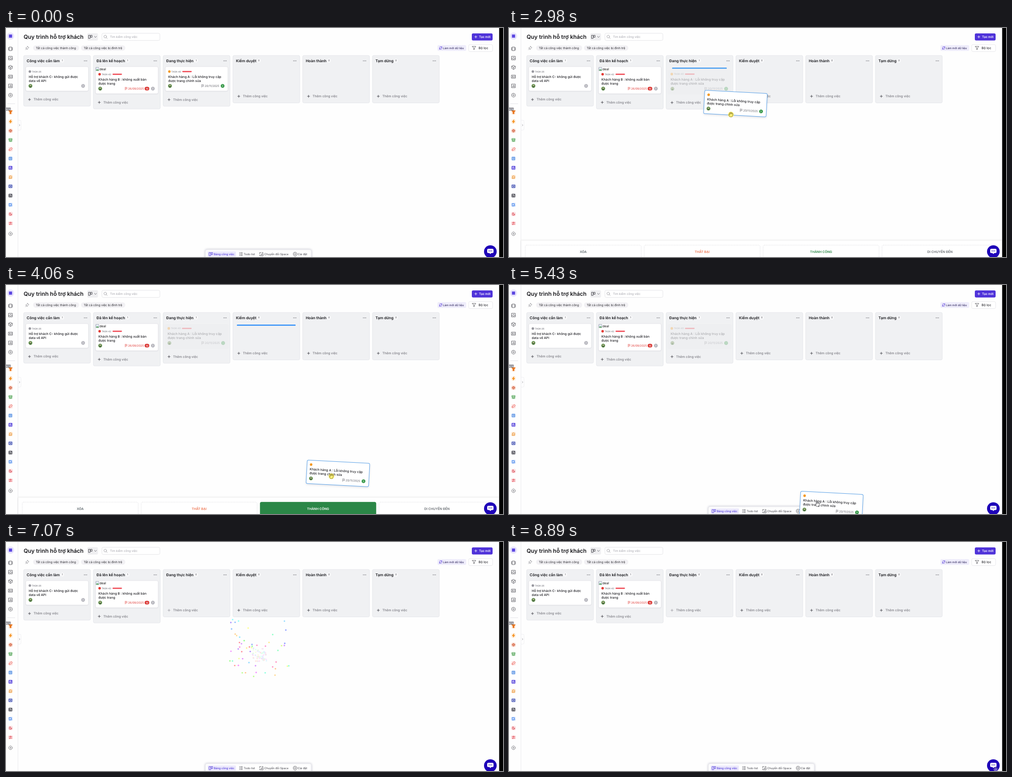
Recreate the animation shown at these times as an HTML page with a canvas. Size 1100 by 509 pixels, loop 8.96 s.

```html
<!DOCTYPE html>
<html lang="vi">
<head>
<meta charset="utf-8">
<title>Bảng công việc</title>
<style>
html, body { margin: 0; width: 100%; height: 100%; overflow: hidden; background: #fff; }
canvas { display: block; width: 1100px; height: 509px; }
</style>
</head>
<body>
<canvas id="stage" width="1100" height="509"></canvas>
<script>
const ctx = document.getElementById('stage').getContext('2d');
const LOOP = 8960, LIFT = 2630, DROP = 5430, RETURNED = 5680, SUCCESS = 5730;

// ---------- drawing helpers ----------
function text(str, x, y, size, color, weight = 400, align = 'left') {
  ctx.font = `${weight} ${size}px Inter, sans-serif`;
  ctx.textAlign = align;
  ctx.fillStyle = color;
  ctx.fillText(str, x, y);
  return ctx.measureText(str).width;
}
function box(x, y, w, h, r, fill, stroke, lineWidth = 0.7) {
  ctx.beginPath();
  ctx.roundRect(x, y, w, h, r);
  if (fill) { ctx.fillStyle = fill; ctx.fill(); }
  if (stroke) { ctx.strokeStyle = stroke; ctx.lineWidth = lineWidth; ctx.stroke(); }
}
function dot(x, y, r, fill) {
  ctx.beginPath();
  ctx.arc(x, y, r, 0, 7);
  ctx.fillStyle = fill;
  ctx.fill();
}
function icon(path, x, y, stroke, lineWidth = 0.8, fill) {
  const shape = new Path2D(path);
  ctx.save();
  ctx.translate(x, y);
  ctx.lineCap = ctx.lineJoin = 'round';
  if (fill) { ctx.fillStyle = fill; ctx.fill(shape); }
  if (stroke) { ctx.strokeStyle = stroke; ctx.lineWidth = lineWidth; ctx.stroke(shape); }
  ctx.restore();
}
function shadowed(color, blur, dy, paint) {
  ctx.save();
  ctx.shadowColor = color;
  ctx.shadowBlur = blur;
  ctx.shadowOffsetY = dy;
  paint();
  ctx.restore();
}

// Smooth curve through [time, x, y] keys; it rests where neighbours repeat.
function follow(keys, t) {
  const last = keys.length - 1;
  if (t <= keys[0][0]) return keys[0].slice(1);
  if (t >= keys[last][0]) return keys[last].slice(1);
  const i = keys.findIndex(k => k[0] > t) - 1;
  const slope = (n, c) => {
    const a = keys[n - 1], b = keys[n], d = keys[n + 1];
    if (!a || !d || a[c] === b[c] || b[c] === d[c]) return 0;
    return (d[c] - a[c]) / (d[0] - a[0]);
  };
  const span = keys[i + 1][0] - keys[i][0], u = (t - keys[i][0]) / span;
  const ease = u * u * (3 - 2 * u);
  return [1, 2].map(c => keys[i][c] + (keys[i + 1][c] - keys[i][c]) * ease
    + span * u * (1 - u) * (slope(i, c) * (1 - u) - slope(i + 1, c) * u));
}

const cardPath = [[LIFT, 422, 113], [2980, 501, 167.7], [3350, 535, 310], [3650, 580, 400],
  [4060, 734.3, 418.7], [4250, 755, 425], [4480, 735, 435], [5000, 713.5, 488], [DROP, 713.5, 488], [RETURNED, 422, 113]];
const cursorPath = [[240, 1027, 493], [1090, 217, 120], [1500, 391, 111], [LIFT, 391, 111],
  [2980, 491, 192], [3350, 520, 325], [3650, 562, 410], [4060, 720, 425], [4250, 735, 428],
  [4480, 710, 440], [5000, 683, 487], [DROP, 683, 487], [5950, 775, 450]];

// ---------- icon paths, centred on 0,0 ----------
const PLUS = 'M-2.6 0H2.6M0-2.6V2.6';
const NEXT = 'M-.9-1.7L.9 0L-.9 1.7';
const BOARD = 'M-3.8-3.5H-.5V3.5H-3.8ZM1-3.5H3.8V1H1Z';
const FLAG = 'M-2 3.2V-3M-2-2.6H2.2L1.1-1L2.2.6H-2';
const FUNNEL = 'M-4-3.5H4L1-.2V3L-1 3.8V-.2Z';
const GEAR = 'M-1.6-4H1.6L4-1.8V1.8L1.6 4H-1.6L-4 1.8V-1.8ZM1.4 0A1.4 1.4 0 1 1 1.4-.1';
const HAND = 'M-2.6 4.8L-4.8.7C-5.3-.5-3.9-1.1-3.2-.2L-2.3 1L-3.4-2.9C-3.7-4.2-2.2-4.5-1.8-3.3L-1.2-1.2'
  + 'L-1.3-4.1C-1.3-5.4.3-5.4.4-4.1L.6-1.3L1.3-3.7C1.6-4.8 3-4.5 2.8-3.3L2.3-.7L3.4-2C4.2-2.8 5.1-2 4.6-1L3.2 2.6L2.6 4.8Z';

const menuIcons = [
  'M-2.5-4H2.5V4H-2.5ZM-4.3-3V3M4.3-3V3',
  'M-4-4H4V4H-4ZM-4 1H-1.5L-.7 2.2H.7L1.5 1H4M-1.5-1.5H1.5',
  'M0-4.4L4-2.2V2.2L0 4.4L-4 2.2V-2.2ZM-4-2.2L0 0L4-2.2M0 0V4.4',
  'M-4.3-3.3H4.3V3.3H-4.3ZM-2.8 1.8C-2.5.2-.3.2 0 1.8M-1.9-1.2H-.9V-.2H-1.9ZM1.6-1H3M1.6 1H3',
  'M-4-4H4V4H-4ZM-1.9 2V0M0 2V-2M1.9 2V-.8',
  GEAR];

const SHEET = 'M-2.8-3H2.8V3H-2.8ZM-1.3-1.2H1.3M-1.3.8H1.3';
const GLOBE = 'M3 0A3 3 0 1 1 3-.1M-3 0H3M0-3V3';
const appIcons = [
  ['#e8741c', '#fdebdc', 'M-4-3.5H4L1.2 0V3.5H-1.2V0Z', true],
  ['#f59324', '#fff0df', 'M.8-4L-3 .7H-.4L-.8 4L3-.7H.4Z', true],
  ['#d0522d', '#fae3da', GLOBE],
  ['#3c9642', '#e2f2e2', 'M-3.2-3H3.2V-.5H-3.2ZM-2.6-.5V3H2.6V-.5M0 .7V3'],
  ['#ea5c56', '#fde4e2', 'M-2.8 1.2L-.8-.8M-1.4-1.5L.4-3A1.7 1.7 0 0 1 3-.4L1.5 1.4M1 .9L-.5 2.7A1.7 1.7 0 0 1-3 .2'],
  ['#2f76db', '#dfeafb', SHEET],
  ['#2a14cc', '#cfc9f8', 'M-3-3H3V3H-3ZM-1.3 0L0 1.2L3-2.6'],
  ['#e88a28', '#fdead3', 'M-3 2.7L-2.2-2L.5-3L3-1L2.2 2.7ZM-1 .5H1'],
  ['#1f2f9a', '#d6dbf6', 'M-3.2-2.8H3.2V2.8H-3.2ZM-1.5-1L1.5 1M1.5-1L-1.5 1'],
  ['#16161c', '#d8d8de', 'M-3-3H3V3H-3ZM-3 0H0V3M1-1H2'],
  ['#2c74e6', '#dbe8fd', 'M-3-2.6H2V-.5M-3-2.6V2.6H0M2.8 1.4A1.3 1.3 0 1 1 2.8 1.3'],
  ['#d8434e', '#fbdfe1', 'M3 .3A3 3 0 1 1-.3-3V.3Z'],
  ['#dd3d49', '#fde3e4', 'M-3.3-1.5H3.3M-3.3 1.8H3.3M0-3V0M-1.4 1.8V3']];

// ---------- page frame ----------
function sidebar() {
  box(26, -1, 0.8, 511, 0, '#e6e6ea');
  dot(10, 18, 8, '#e9e5fc');
  box(6.5, 14.5, 7, 7, 0, '#5a45e0');
  menuIcons.forEach((path, i) => icon(path, 10, 46.3 + i * 20.6, '#3a3a42', 0.8));
  box(3, 167.8, 17, 0.8, 0, '#dcdce2');
  appIcons.forEach(([color, pale, path, solid], i) => {
    const y = 187.3 + i * 20.57;
    box(5.3, y - 4.7, 9.4, 9.4, 2, pale);
    icon(path, 10, y, color, 1, solid && color);
  });
  box(-2, 177, 12.5, 6.5, 1, '#85858d');
  text('BETA', -0.5, 182, 4.1, '#fff', 600);
  icon('M4 0A4 4 0 1 1 4-.1M-1.4 0H1.4M0-1.4V1.4', 10, 457.5, '#55555c', 0.8);
  box(26.6, 205, 6.6, 22, [0, 3, 3, 0], '#fff', '#e9e9ed');
  icon(NEXT, 30, 216, '#77777f', 0.7);
}

function header() {
  text('Quy trình hỗ trợ khách', 39, 24.2, 12.36, '#17171b', 600);
  box(180, 11.5, 23.5, 16.5, 3, '#efeff1');
  icon(BOARD, 186.7, 19.7, '#33333a', 0.9);
  icon('M-2.5-1.2L0 1.3L2.5-1.2', 198, 19.7, '#55555c');
  box(212.3, 11.8, 128.3, 15.8, 3, '#fff', '#dadade');
  icon('M2.4-.6A3 3 0 1 1 2.4-.7M1.6 1.6L3.8 3.8', 220.3, 19.7, '#77777f', 0.7);
  text('Tìm kiếm công việc', 230, 22.1, 6.65, '#a2a2aa');
  box(1031, 12, 46, 15.8, 3, '#4f33d9');
  icon(PLUS, 1039.8, 19.7, '#fff', 0.9);
  text('Tạo mới', 1047, 22.2, 6.65, '#fff', 600);

  icon('M.5-3.8L3.8-.5L2.2 0L.3 2L.2 3.6L-3.4 0L-1.8-.2L0-2.2ZM-1.6 1.8L-3.8 4', 47, 44.3, '#66666e', 0.7);
  box(60, 38.5, 102, 12, 6, '#f2f1f4');
  text('Tất cả công việc thành công', 66, 46.9, 6.65, '#222228');
  box(166, 38.5, 98, 12, 6, '#f2f1f4');
  text('Tất cả công việc bị đình trệ', 172, 46.9, 6.65, '#222228');
  box(955, 38, 63.5, 13, 3, '#efedfb');
  icon('M-2.7-.6A2.8 2.8 0 0 1 2.3-1.6M2.7-3V-1.2H1M2.7.6A2.8 2.8 0 0 1-2.3 1.6M-2.7 3V1.2H-1', 962, 44.4, '#4f33d9', 0.9);
  text('Làm mới dữ liệu', 967, 46.7, 6.18, '#352d63', 500);
  box(1024, 36.8, 53, 15.6, 3, '#fff', '#dedee3');
  icon(FUNNEL, 1036, 44.4, '#44444b', 0.8);
  text('Bộ lọc', 1046, 47, 7.2, '#2c2c32', 500);
}

function bottomTabs() {
  shadowed('rgba(40,40,80,.22)', 5, 0, () => box(441, 492.3, 235, 24, 4, '#fff', '#dfdfe5'));
  box(446, 496.8, 63, 11.5, 2, '#ece9fc');
  icon(BOARD, 453.6, 502.6, '#4b35d9', 0.9);
  text('Bảng công việc', 460, 504.8, 6.18, '#4b35d9', 500);
  icon('M-3.3-3H-2M-3.3 0H-2M-3.3 3H-2M-.5-3H3.4M-.5 0H3.4M-.5 3H3.4', 520, 502.6, '#33333a', 0.9);
  text('Todo list', 526.3, 504.8, 6.18, '#3a3a42');
  icon('M-3.8-1V-3.5H-1M-3.8 1.5V3.5H-1.5M1-3.5H3.5V-1.5M0 0H3.8V3.6H0Z', 565.3, 502.6, '#33333a', 0.8);
  text('Chuyển đổi Space', 571.8, 504.8, 6.18, '#3a3a42');
  icon(GEAR, 640, 502.6, '#33333a', 0.8);
  text('Cài đặt', 646, 504.8, 6.18, '#3a3a42');
}

function chatButton() {
  dot(1072, 497, 14, '#1e04b8');
  icon('M-4.5-5.5H4.5Q7-5.5 7-3V1.5Q7 4 4.5 4H2L0 6.3L-2 4H-4.5Q-7 4-7 1.5V-3Q-7-5.5-4.5-5.5Z', 1072, 496.2, null, 0, '#fff');
  [-3, 0, 3].forEach(dx => dot(1072 + dx, 495.5, 1, '#1e04b8'));
}

// ---------- board ----------
const columnX = i => 39 + 154.4 * i;

const cards = [
  { id: 'TASK-26', dot: '#98989f', lines: ['Hỗ trợ khách C- không gửi được', 'data về API'], next: '#b8b8bf' },
  { id: 'TASK-42', dot: '#e23a34', bar: true, image: true, lines: ['Khách hàng B : không xuất bản', 'được trang'],
    date: '26/09/2025', dateColor: '#e03a36', late: '10', next: '#b8b8bf' },
  { id: 'TASK-40', dot: '#f49a24', bar: true, lines: ['Khách hàng A : Lỗi không truy cập', 'được trang chỉnh sửa'],
    date: '20/11/2025', dateColor: '#62626a', next: '#3a9a4c' }];

function drawCard(card, x, y, { border = '#e4e4e9', lineWidth = 0.7, compact = false, raised = false } = {}) {
  const height = card.image ? 60 : compact ? 52 : 54;
  ctx.save();
  ctx.translate(x, y);
  shadowed('rgba(30,30,60,.15)', raised ? 5 : 2, raised ? 2 : 0.5,
    () => box(0, 0, 138.5, height, 3, '#fff'));
  box(0, 0, 138.5, height, 3, null, border, lineWidth);
  if (card.image) {
    box(0.6, 1.6, 7, 7.4, 0.5, '#e4ecf8', '#8a929c', 0.7);
    icon('M-3 2.8L-1 0L.5 1.4L2 0L3 2.8Z', 4, 5.6, null, 0, '#4fa04f');
    text('deal', 8.7, 8.2, 7.2, '#111');
    ctx.translate(0, 6);
  }
  dot(9, compact ? 9.6 : 10.8, 2.8, card.dot);
  if (compact) {
    ctx.translate(0, -2.4);
  } else {
    text(card.id, 13.5, 12.6, 5, '#73737b', 500);
    if (card.bar) box(37.5, 9.4, 21, 2.8, 1.4, '#ef4a55');
  }
  card.lines.forEach((line, i) => text(line, 6.4, 24.9 + i * 8.7, 7.18, '#1c1c21', 500));
  dot(10.3, 42.7, 4.2, '#5f8f4c');
  dot(10.3, 41.9, 1.6, '#c9b49a');
  box(8.2, 43.6, 4.2, 1.8, 0.9, '#3f5c39');
  dot(126.8, 42.7, 4.2, card.next);
  icon(NEXT, 126.8, 42.7, '#fff', 0.8);
  if (card.date) {
    const end = card.late ? 107 : 119.4;
    const width = text(card.date, end, 44.9, 6.18, card.dateColor, 400, 'right');
    icon(FLAG, end - width - 4.4, 42.7, card.dateColor, 0.7);
  }
  if (card.late) {
    box(108.7, 38.7, 10.2, 8, 4, '#d9322f');
    text(card.late, 113.8, 44.6, 5.2, '#fff', 600, 'center');
  }
  ctx.restore();
}

const titles = ['Công việc cần làm', 'Đã lên kế hoạch', 'Đang thực hiện', 'Kiểm duyệt', 'Hoàn thành', 'Tạm dừng'];

function drawColumn(title, i, bottom, count, faded) {
  const x = columnX(i);
  box(x, 61, 148, bottom - 61, 3, '#f0f1f3', '#dfe0e5');
  const end = x + 6.8 + text(title, x + 6.8, 75.5, 8.25, '#18181c', 600);
  box(end + 1.6, 68.4, 8, 8, 4, '#fbfbfc');
  text(count, end + 5.6, 74.4, 5.2, '#55555c', 500, 'center');
  [-2.7, 0, 2.7].forEach(dx => dot(x + 137 + dx, 73, 0.75, '#4a4a52'));
  icon(PLUS, x + 13, bottom - 14.7, faded ? '#9a9aa1' : '#3c3c43', 0.9);
  text('Thêm công việc', x + 22, bottom - 12.4, 7.2, '#77777e', 500);
}

function board(t) {
  const lifted = t >= LIFT, done = t >= SUCCESS;
  const lineHere = lifted && t < 3200, lineNext = t >= 3720 && t < 4600;
  const bottoms = [173.7, 180, done ? 166.5 : lineHere ? 180.5 : 174, 166.5, 166.5, 166.5];
  titles.forEach((title, i) =>
    drawColumn(title, i, bottoms[i], i < 2 || (i === 2 && !done) ? '1' : '0', i === 2 && done));

  const hover = '#b4b8cc';
  drawCard(cards[0], 43.8, 86);
  drawCard(cards[1], 198.2, 86, t >= 1160 && t < 1360 ? { border: hover, lineWidth: 1 } : {});
  if (!lifted) {
    drawCard(cards[2], 352.6, 86, t >= 850 ? { border: hover, lineWidth: 1.1, raised: true } : {});
  } else if (!done) {
    ctx.save();
    ctx.globalAlpha = 0.3;
    ctx.translate(421.8, lineHere ? 119 : 113);
    ctx.scale(1.02, 1.02);
    drawCard(cards[2], -69.25, -27, { border: '#f4f4f6' });
    ctx.restore();
  }
  if (lineHere) box(361, 88, 121, 2.6, 1.2, '#459cf0');
  if (lineNext) box(511, 88, 130, 2.6, 1.2, '#2f8ffa');
}

// ---------- drop zones ----------
const zones = [['XÓA', '#5d676c'], ['THẤT BẠI', '#ee7550'], ['THÀNH CÔNG', '#2b8747'], ['DI CHUYỂN ĐẾN', '#666b70']];

function dropZones(t) {
  const active = t >= 3720 ? 2 : t >= 3580 ? 1 : -1;
  shadowed('rgba(0,0,0,.12)', 4, -1, () => box(27, 472.5, 1064, 40, 0, '#fff'));
  zones.forEach(([label, color], i) => {
    const x = 36 + i * 263.2, on = i === active;
    ctx.save();
    if (!on) ctx.setLineDash([2, 1.5]);
    box(x, 482.6, 256.6, 32, 3, on ? color : '#fff', on ? color : '#d3d3d8');
    ctx.restore();
    text(label, x + 128.3, 499.6, 7.1, on ? '#fff' : color, 600, 'center');
  });
}

function draggedCard(t) {
  const [x, y] = follow(cardPath, t);
  ctx.save();
  ctx.translate(x, y);
  ctx.rotate(0.054);
  drawCard(cards[2], -69.25, -26, { border: '#559fe8', lineWidth: 1, compact: true, raised: true });
  ctx.restore();
}

// ---------- fireworks: white sparks spread, take on colour, then fall and fade ----------
const random = seed => {
  const v = Math.sin(seed * 12.9898) * 43758.5453;
  return v - Math.floor(v);
};

function burst(t, start, duration, seed) {
  const u = (t - start) / duration;
  if (u < 0 || u >= 1 || t > 7760) return;
  const spread = 1 - (1 - u) ** 1.7, fall = u ** 1.7;
  ctx.globalAlpha = 1 - fall;
  for (let i = 0; i < 51; i++) {
    const n = seed + i * 3;
    const x = 561 + (random(n) - 0.5) * 258 * spread;
    const y = 261 + (random(n + 1) * 258 - 215) * spread + 103 * fall;
    dot(x, y, 1.7, `hsl(${random(n + 2) * 360}, 100%, ${100 - 50 * spread}%)`);
  }
  ctx.globalAlpha = 1;
}

// ---------- pointer ----------
function pointer(t) {
  let [x, y] = follow(cursorPath, t), alpha = 1;
  if (t < 240) return;
  if (t > 6390) alpha = 1 - (t - 6390) / 140;
  if (t >= 8350) {
    [x, y] = [1077, 505];
    alpha = 0.4 * Math.min(1, (t - 8350) / 140);
  }
  if (alpha <= 0) return;
  const pressed = t >= 2230 && t < DROP;
  if (pressed) {
    ctx.globalAlpha = 0.75;
    dot(x, y, 6.2, '#ffec3d');
  }
  ctx.globalAlpha = alpha;
  icon(HAND, x, y, pressed ? '#6b6424' : '#33333a', 0.7, pressed ? '#fff27a' : '#fff');
  ctx.globalAlpha = 1;
}

function draw(t) {
  ctx.textRendering = 'geometricPrecision';
  box(0, 0, 1100, 509, 0, '#fefefe');
  sidebar();
  header();
  board(t);
  if (t >= LIFT && t < DROP) dropZones(t);
  else bottomTabs();
  if (t >= LIFT && t < RETURNED) draggedCard(t);
  burst(t, SUCCESS, 1000, 1);
  burst(t, SUCCESS + 1000, 1000, 1);
  burst(t, SUCCESS + 1250, 1250, 401);
  chatButton();
  box(1091.5, 0, 9, 509, 0, '#000');
  pointer(t);
}

const begin = performance.now();
function tick() {
  draw((performance.now() - begin) % LOOP);
  requestAnimationFrame(tick);
}
tick();
</script>
</body>
</html>
```
